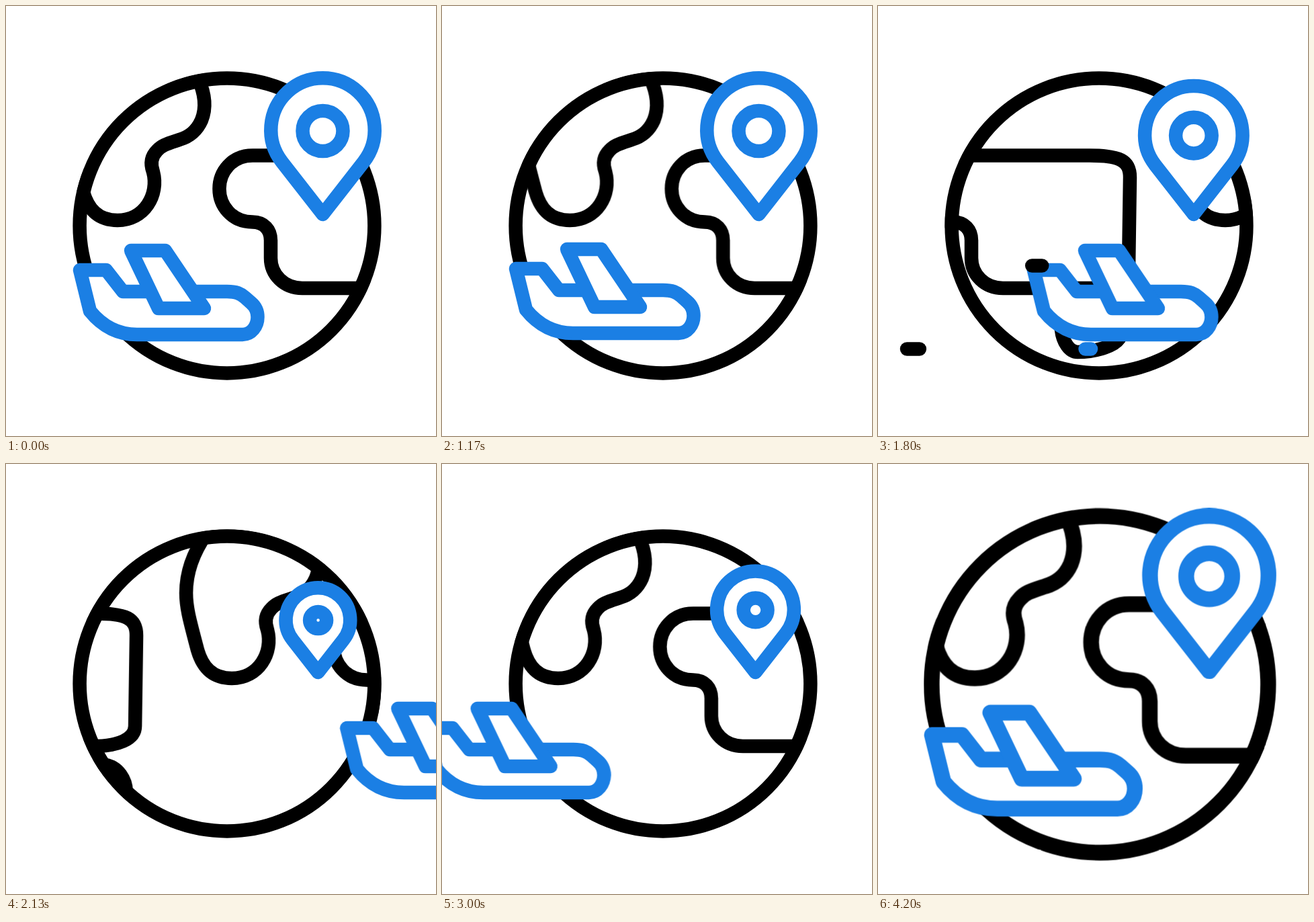
Recreate the animation shown at these times as an HTML page. Size 640 by 640 pixels, loop 4.23 s.

```html
<!DOCTYPE html>
<html lang="en">
<head>
<meta charset="utf-8">
<title>Flight around the globe</title>
<style>
  html, body { margin: 0; height: 100%; overflow: hidden; background: #fff; }
  svg {
    display: block; width: 100vw; height: 100vh;
    fill: none; stroke: #000; stroke-width: 20.5;
    stroke-linecap: round; stroke-linejoin: round;
  }
  .blue { stroke: #1b7fe4; }
  .solid { fill: #fff; }

  .scene, .world, .fly, .bob, .pin, .ring { animation: 4230ms infinite; }

  .scene { animation-name: zoom; animation-timing-function: step-end; transform-origin: 320px 320px; }
  @keyframes zoom {
    0% { transform: none; }
    99.29%, 100% { transform: scale(1.1415); }
  }

  /* one full turn is 606 units, with a wind-up against the turn */
  .world { animation-name: turn; }
  @keyframes turn {
    0%, 12.53% { transform: translateX(0); animation-timing-function: cubic-bezier(.55, -.35, .3, 1); }
    77.78%, 100% { transform: translateX(-606px); }
  }

  .fly { animation-name: fly; }
  @keyframes fly {
    0%, 27.66% { transform: translateX(0); animation-timing-function: ease-in-out; }
    32.43% { transform: translateX(-7.5px); animation-timing-function: cubic-bezier(.333, 0, .667, .333); }
    53.3% { transform: translateX(540px); animation-timing-function: step-start; }
    63.83% { transform: translateX(-513px); animation-timing-function: cubic-bezier(.333, .95, .667, 1); }
    82.55%, 100% { transform: translateX(0); }
  }

  .bob { animation-name: bob; animation-timing-function: ease-in-out; }
  @keyframes bob {
    0%, 33.1%, 82.55%, 100% { transform: translateY(0); }
    16.5% { transform: translateY(-9px); }
    91% { transform: translateY(-5px); }
  }

  /* the outline shrinks towards its tip while the stroke keeps its width */
  .pin, .ring { animation-timing-function: cubic-bezier(.37, 0, .63, 1); }
  .pin { animation-name: pin; }
  @keyframes pin {
    0%, 30.73%, 88.65%, 100% { d: path("M471.5 310L410.7 232.1A77.2 77.2 0 1 1 532.3 232.1Z"); }
    38.65%, 78.25% { d: path("M471.8 310L407.4 227.5A81.7 81.7 0 1 1 536.2 227.5Z"); }
    50%, 66.9% { d: path("M464.4 310L426.7 261.7A47.9 47.9 0 1 1 502.1 261.7Z"); }
  }
  .ring { animation-name: ring; }
  @keyframes ring {
    0%, 30.73%, 88.65%, 100% { cx: 471.5px; cy: 186px; r: 30px; }
    38.65%, 78.25% { cx: 471.8px; cy: 178.2px; r: 32px; }
    50%, 66.9% { cx: 464.6px; cy: 232.6px; r: 12.5px; }
  }

  .dash { opacity: 0; stroke-dasharray: 10 300; animation: dash 4230ms linear infinite; }
  @keyframes dash {
    0% { opacity: 1; stroke-dashoffset: 10; }
    6.5% { opacity: 1; stroke-dashoffset: -100; }
    6.51%, 100% { opacity: 0; stroke-dashoffset: -100; }
  }
</style>
</head>
<body>
<svg viewBox="0 0 640 640">
  <defs>
    <clipPath id="disc"><circle cx="329" cy="327" r="229.5"/></clipPath>
    <g id="lands">
      <path d="M286 108C296 130 299 150 291 170C283 188 271 195 258 199C240 205 232 207 225 215
               C215 225 215 236 219 247C228 281 206 319 166 319C136 319 122 301 115 277
               C104 235 98 215 98 192C98 160 110 130 128 104Z"/>
      <path d="M570 222.5H367C336 222.5 317.5 247 317.5 272S336 321.5 367 321.5C384 321.5 394 333 394 349
               V375C394 400 414 420 441 420H572C600 419 628 411 628 390L630 255C630 230 615 222.5 570 222.5Z"/>
      <path d="M528 482C530 500 540 515 552 515C575 515 605 508 614 495C618 470 600 448 582 448
               C550 448 528 460 528 482Z"/>
    </g>
  </defs>

  <g class="scene">
    <g clip-path="url(#disc)">
      <g class="world">
        <use href="#lands"/>
        <use href="#lands" x="606"/>
      </g>
    </g>
    <circle cx="329" cy="327" r="219.4"/>

    <g class="blue solid">
      <path class="pin" d="M471.5 310L410.7 232.1A77.2 77.2 0 1 1 532.3 232.1Z"/>
      <circle class="ring" cx="471.5" cy="186" r="30"/>
    </g>

    <g class="fly blue solid">
      <g class="bob">
        <path d="M110 393H149L174 425H329C343 425 349 428 356 434L365 442C372 448 374.5 455 374.5 463
                 C374.5 477 365 489 352 489H195C165 489 142 475 125 454Z"/>
        <path d="M186 364H237L295 450H227Z"/>
      </g>
    </g>

    <path class="dash" pathLength="100" d="M210 510.5H22" style="animation-delay: 1579ms"/>
    <path class="dash" pathLength="100" d="M300 386.5H150" style="animation-delay: 1683ms"/>
    <path class="dash blue" pathLength="100" d="M317 510.5H140" style="animation-delay: 1789ms"/>
  </g>
</svg>
</body>
</html>
```
